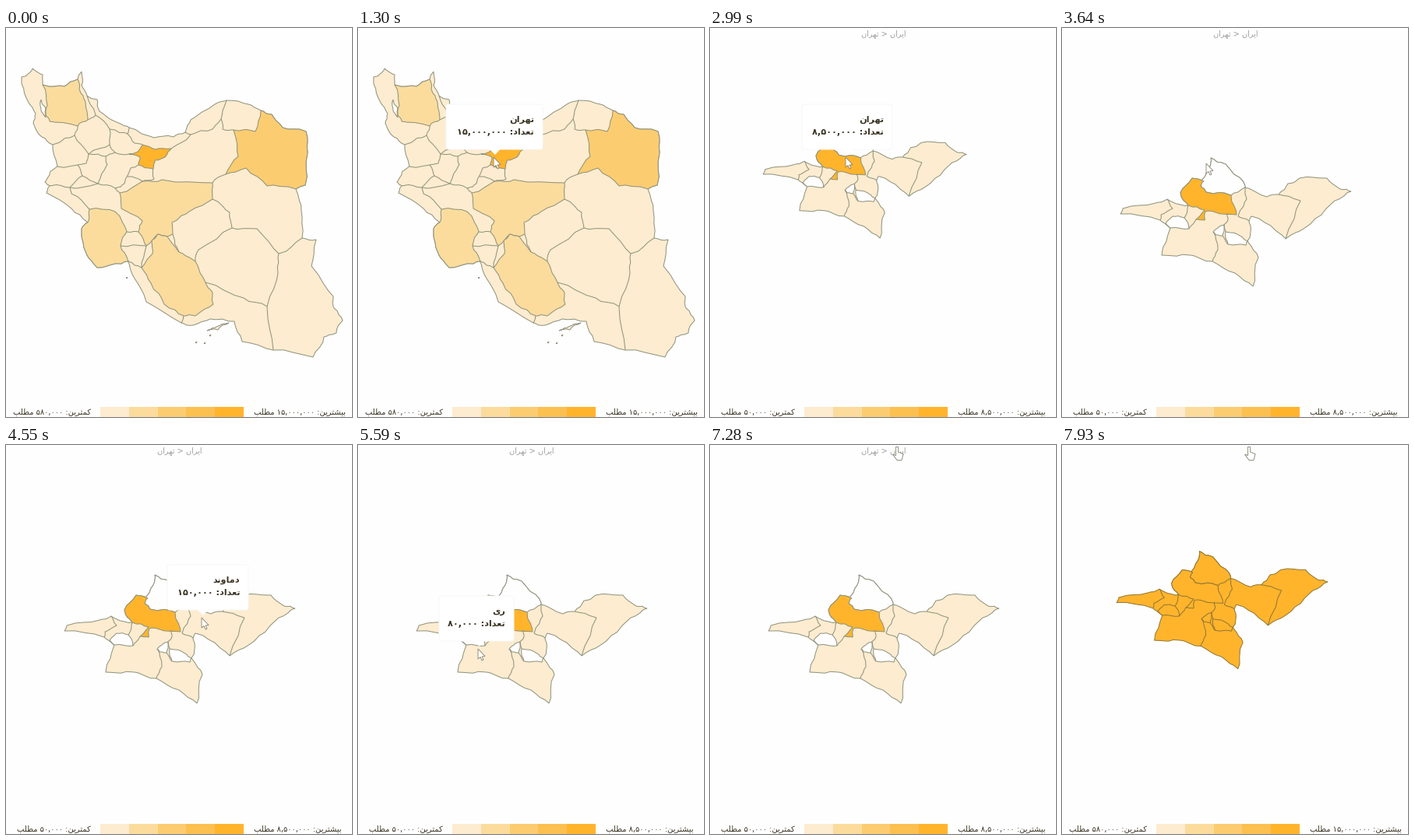
These frames come from a looping animation (444 px wide and 500 px high, 8000 ms). A matplotlib script:

```python
import math

import matplotlib.pyplot as plt
import numpy as np
from matplotlib.animation import FuncAnimation
from matplotlib.patches import FancyBboxPatch, Polygon, Rectangle
from matplotlib.transforms import Affine2D

W, H, DPI = 444, 500, 64
PX = 72 / DPI                     # points per pixel
LOOP, INTERVAL, STEP = 8000, 40, 130
DRILL, BACK = 2600, 7800          # province opened, country clicked

RAMP = ["#fdeccf", "#fbdc9c", "#fccc70", "#fcc050", "#ffb42c"]
PALE, SAND, HONEY, _, ORANGE = RAMP
WHITE, EDGE, EDGE_ON_ORANGE = "#fefefe", "#8d917c", "#8f7632"

# ---------------------------------------------------------------- text
FORMS = {"ا": 0xFE8D, "ب": 0xFE8F, "ت": 0xFE95, "د": 0xFEA9, "ر": 0xFEAD,
         "ش": 0xFEB5, "ط": 0xFEC1, "ع": 0xFEC9, "ل": 0xFEDD, "م": 0xFEE1,
         "ن": 0xFEE5, "ه": 0xFEE9, "و": 0xFEED, "ی": 0xFBFC, "ک": 0xFB8E}
NO_JOIN = "ادرو"


def shape(word):
    """Join the letters of one word and put them in visual order."""
    if word[0] not in FORMS:
        return word
    out = []
    for i, ch in enumerate(word):
        if ch not in FORMS:
            out.append(ch)
            continue
        before = i > 0 and word[i - 1] not in NO_JOIN
        after = ch not in NO_JOIN and word[i + 1:i + 2] in FORMS
        out.append(chr(FORMS[ch] + before + 2 * after))
    return "".join(reversed(out))


def rtl(text):
    return " ".join(shape(w) for w in reversed(text.split()))


def fa(n):
    return "".join(chr(0x06F0 + int(c)) if c.isdigit() else c for c in f"{n:,}")


# ---------------------------------------------------------------- stage
fig = plt.figure(figsize=(W / DPI, H / DPI), dpi=DPI, facecolor=WHITE)
ax = fig.add_axes([0, 0, 1, 1])
ax.set_xlim(0, W)
ax.set_ylim(H, 0)
ax.axis("off")


def rough(pts, levels=2):
    """Bend every edge a little; shared edges bend the same way."""
    out = [pts[0]]
    for (x1, y1), (x2, y2) in zip(pts, pts[1:]):
        amp = 0.09 * min(math.hypot(x2 - x1, y2 - y1), 18)
        key = 12.9 * (x1 + x2) + 7.3 * (y1 + y2)
        out.append(((x1 + x2) / 2 + amp * math.sin(key),
                    (y1 + y2) / 2 + amp * math.cos(1.7 * key)))
        out.append((x2, y2))
    return rough(out, levels - 1) if levels > 1 else out


def area(group, color, pts):
    patch = Polygon(rough(pts + pts[:1]), fc=color, ec=EDGE, lw=PX, zorder=1)
    group.append((ax.add_patch(patch), color))


def border(group, *pts):
    patch = Polygon(rough(pts), closed=False, fill=False, ec=EDGE, lw=PX,
                    zorder=2)
    group.append((ax.add_patch(patch), None))


# ---------------------------------------------------------------- country
country = []
north = [(20, 63), (31, 57), (34, 52), (47, 60), (47, 73), (75, 75), (92, 66),
         (97, 56), (97, 73), (104, 87), (117, 92), (120, 107), (142, 121),
         (158, 128), (190, 141), (215, 140), (230, 134), (237, 118),
         (268, 98), (283, 93), (311, 98), (327, 106)]
east = [(341, 111), (355, 128), (385, 133), (387, 160), (384, 202), (372, 207),
        (379, 235), (380, 270), (398, 272), (392, 306), (420, 345), (421, 360),
        (432, 376), (424, 392), (408, 397), (394, 423)]
south = [(343, 414), (303, 403), (293, 377), (262, 374), (240, 382),
         (225, 379), (180, 352), (165, 322), (157, 300), (148, 303),
         (117, 308), (104, 292), (97, 258), (105, 250)]
west = [(84, 232), (52, 212), (56, 203), (50, 198), (57, 184), (66, 178),
        (60, 150), (46, 140), (35, 122), (38, 110), (27, 92)]
area(country, PALE, north + east + south + west)
area(country, SAND, north[4:7] + [
    (94, 78), (102, 95), (105, 118), (92, 126), (56, 120), (51, 112),
    (53, 100)])
area(country, HONEY, north[-1:] + east[:6] + [
    (335, 203), (308, 180), (282, 188), (298, 165), (292, 131), (320, 133)])
area(country, SAND, south[-6:] + [
    (107, 233), (140, 236), (155, 262), (147, 280)])
area(country, SAND, [
    (146, 212), (175, 197), (200, 195), (265, 199), (265, 220), (235, 236),
    (213, 250), (214, 265), (207, 268), (195, 265), (180, 280), (170, 262),
    (175, 248), (148, 232)])
area(country, SAND, [
    (195, 265), (207, 268), (222, 288), (243, 300), (256, 327), (265, 340),
    (266, 355), (243, 370), (228, 370), (203, 355), (186, 328), (174, 308),
    (188, 290), (187, 273)])
area(country, ORANGE, [
    (158, 162), (170, 158), (175, 150), (192, 156), (212, 155), (205, 165),
    (191, 170), (189, 181), (170, 176), (172, 166)])
area(country, WHITE, [(45, 92), (51, 104), (51, 115), (45, 106)])
area(country, PALE, [(258, 389), (270, 384), (286, 379), (272, 388)])
for x, y in ((155, 321), (244, 404), (255, 405), (262, 395)):
    area(country, PALE, [(x - 1, y), (x + 1, y - 0.5), (x, y + 1)])

border(country, (104, 87), (115, 112), (105, 118))
border(country, (115, 112), (133, 130), (156, 136), (158, 128))
border(country, (133, 130), (133, 150), (106, 162), (88, 138), (92, 126))
border(country, (133, 150), (140, 160), (158, 162))
border(country, (156, 136), (165, 148), (175, 150))
border(country, (60, 150), (75, 142), (88, 138))
border(country, (106, 162), (103, 174), (66, 178))
border(country, (92, 176), (98, 190), (82, 205), (56, 203))
border(country, (106, 162), (128, 165), (130, 175), (118, 200), (98, 190))
border(country, (82, 205), (118, 200), (140, 206), (146, 212))
border(country, (82, 205), (84, 213), (107, 233))
border(country, (128, 165), (140, 160))
border(country, (170, 176), (160, 180), (152, 200), (140, 206))
border(country, (156, 191), (175, 197), (190, 194), (189, 181))
border(country, (212, 155), (237, 137), (230, 134))
border(country, (237, 137), (265, 130), (276, 117), (283, 93))
border(country, (276, 117), (278, 130), (292, 131))
border(country, (265, 199), (282, 188))
border(country, (265, 220), (287, 237), (290, 257), (247, 285), (243, 300))
border(country, (214, 265), (222, 288))
border(country, (290, 257), (322, 258), (350, 290), (380, 270))
border(country, (350, 290), (349, 315), (335, 358), (343, 414))
border(country, (256, 327), (305, 347), (335, 358))
border(country, (228, 370), (225, 379))
border(country, (155, 262), (170, 262))
border(country, (147, 280), (180, 280), (174, 308), (157, 300))

# ---------------------------------------------------------------- province
province = []
top = [(178, 203), (189, 180), (191, 167), (210, 175), (233, 198), (235, 205)]
right = [(263, 217), (278, 214), (290, 200), (305, 193), (340, 193),
         (357, 207), (371, 210), (350, 222), (325, 245), (310, 258),
         (287, 271), (260, 250), (243, 242), (240, 248)]
bottom = [(242, 262), (238, 274), (252, 295), (245, 332), (222, 315),
          (193, 300), (165, 292), (128, 292), (139, 257)]
left = [(126, 247), (75, 239), (78, 232), (120, 225), (135, 220), (147, 226)]
city = [(162, 228), (152, 212), (167, 193), (182, 197)]
area(province, PALE, top + right + bottom + left + city)
area(province, WHITE, top + [(217, 215), (185, 211)])
area(province, ORANGE, city + [
    (178, 203), (185, 211), (217, 215), (224, 240), (194, 236), (184, 236),
    (183, 247), (172, 246), (183, 234)])
area(province, WHITE, [(133, 251), (142, 242), (157, 244), (163, 258),
                       (139, 257)])
area(province, WHITE, [(194, 262), (208, 253), (206, 267), (197, 266)])
area(province, WHITE, [(210, 262), (230, 268), (238, 274), (236, 279),
                       (213, 278)])
border(province, (235, 205), (237, 220), (226, 242), (240, 248))
border(province, (278, 214), (306, 222), (287, 271))
border(province, (135, 220), (142, 232), (127, 240), (126, 247))
border(province, (157, 244), (162, 228))
border(province, (163, 258), (172, 246))
border(province, (194, 262), (200, 285), (193, 300))
border(province, (212, 238), (213, 246), (208, 253), (210, 262))
border(province, (206, 267), (213, 278))


# ---------------------------------------------------------------- overlay
def label(x, y, text, size, ha="left", color="#3a3423", **kw):
    return ax.text(x, y, text, fontsize=size * PX, ha=ha, va="baseline",
                   color=color, family="DejaVu Sans", **kw)


for k, c in enumerate(RAMP):
    ax.add_patch(Rectangle((121 + 36.8 * k, 486.5), 36.9, 13, fc=c, lw=0))
low = label(109, 496, "", 9.9, "right")
high = label(318, 496, "", 9.9)
crumb = label(252, 10, rtl("ایران > تهران"), 9.8, "right", "#a0a0a0")

box = FancyBboxPatch((0, 0), 1, 1, boxstyle="round,pad=0,rounding_size=3",
                     fc="white", ec="#f8f8f8", lw=PX, zorder=5)
tail = Polygon([(0, 0)] * 3, fc="white", lw=0, zorder=5)
ax.add_patch(box)
ax.add_patch(tail)
title = label(0, 0, "", 11.2, "right", weight="bold", zorder=6)
count = label(0, 0, "", 11.2, "right", weight="bold", zorder=6)

ARROW = np.array([(0, 0), (0, 13), (3, 10.5), (5, 15), (7, 14), (5, 10),
                  (9, 9.5)])
HAND = np.array([(-1.5, 0), (1.5, 0), (1.5, 6.5), (8, 9), (6, 17), (0, 17),
                 (-5.5, 9.5), (-1.5, 11)])
cursor = Polygon(ARROW, fc="white", ec="#8c8676", lw=0.9 * PX, zorder=8)
ax.add_patch(cursor)

# time, x, y of the pointer tip
PATH = np.array([(520, 206, 60), (1170, 174, 166), (3510, 174, 166),
                 (4420, 251, 222), (4680, 251, 222), (5460, 154, 262),
                 (5850, 154, 262), (7150, 240, 2.5)])
# start, end, place, value, half width, shift
TIPS = [(1040, 2600, "تهران", 15_000_000, 62, 1),
        (2730, 3510, "تهران", 8_500_000, 58, 2),
        (4160, 4810, "دماوند", 150_000, 52, 8),
        (5330, 6110, "ری", 80_000, 48, -2)]


def zoom(t):
    if t >= BACK:
        return 0.96 - 0.044 * (t - BACK) / STEP
    u = min(max((t - DRILL) / 780, 0), 1)
    return 1 - 0.47 * (1 - u) ** 2


def show_tip(t, x, y):
    tip = next((p for p in TIPS if p[0] <= t < p[1]), None)
    for art in (box, tail, title, count):
        art.set_visible(tip is not None)
    if tip is None:
        return
    _, _, place, value, half, dx = tip
    mid, base = x + dx, y - 10
    box.set_bounds(mid - half, base - 58, 2 * half, 58)
    tail.set_xy([(x - 6, base - 1), (x + 9, base - 1), (x + 2, base + 7)])
    title.set_text(rtl(place))
    title.set_position((mid + half - 11, base - 35))
    count.set_text(rtl(f"تعداد: {fa(value)}"))
    count.set_position((mid + half - 11, base - 19))


def draw(i):
    t = (i * INTERVAL + INTERVAL - 1) // STEP * STEP
    leaving = t >= BACK
    inside = t >= DRILL

    for patch, _ in country:
        patch.set_visible(not inside)
    s = zoom(t)
    view = Affine2D().scale(s).translate(16 * (1 - s), -195 * (1 - s))
    for patch, color in province:
        patch.set_visible(inside)
        patch.set_transform(view + ax.transData)
        patch.set_edgecolor(EDGE_ON_ORANGE if leaving else EDGE)
        if color:
            patch.set_facecolor(ORANGE if leaving else color)

    lo, hi = 580_000, 15_000_000
    if inside and not leaving:
        lo, hi = 50_000, 8_500_000
    low.set_text(rtl(f"کمترین: {fa(lo)} مطلب"))
    high.set_text(rtl(f"بیشترین: {fa(hi)} مطلب"))
    crumb.set_visible(inside and not leaving)

    x, y = (np.interp(t, PATH[:, 0], PATH[:, k]) for k in (1, 2))
    cursor.set_visible(t >= PATH[0, 0])
    cursor.set_xy((HAND if t >= PATH[-1, 0] else ARROW) + (x, y))
    show_tip(t, x, y)
    return []


anim = FuncAnimation(fig, draw, frames=LOOP // INTERVAL, interval=INTERVAL,
                     repeat=True, repeat_delay=0, blit=False)
plt.show()
```
